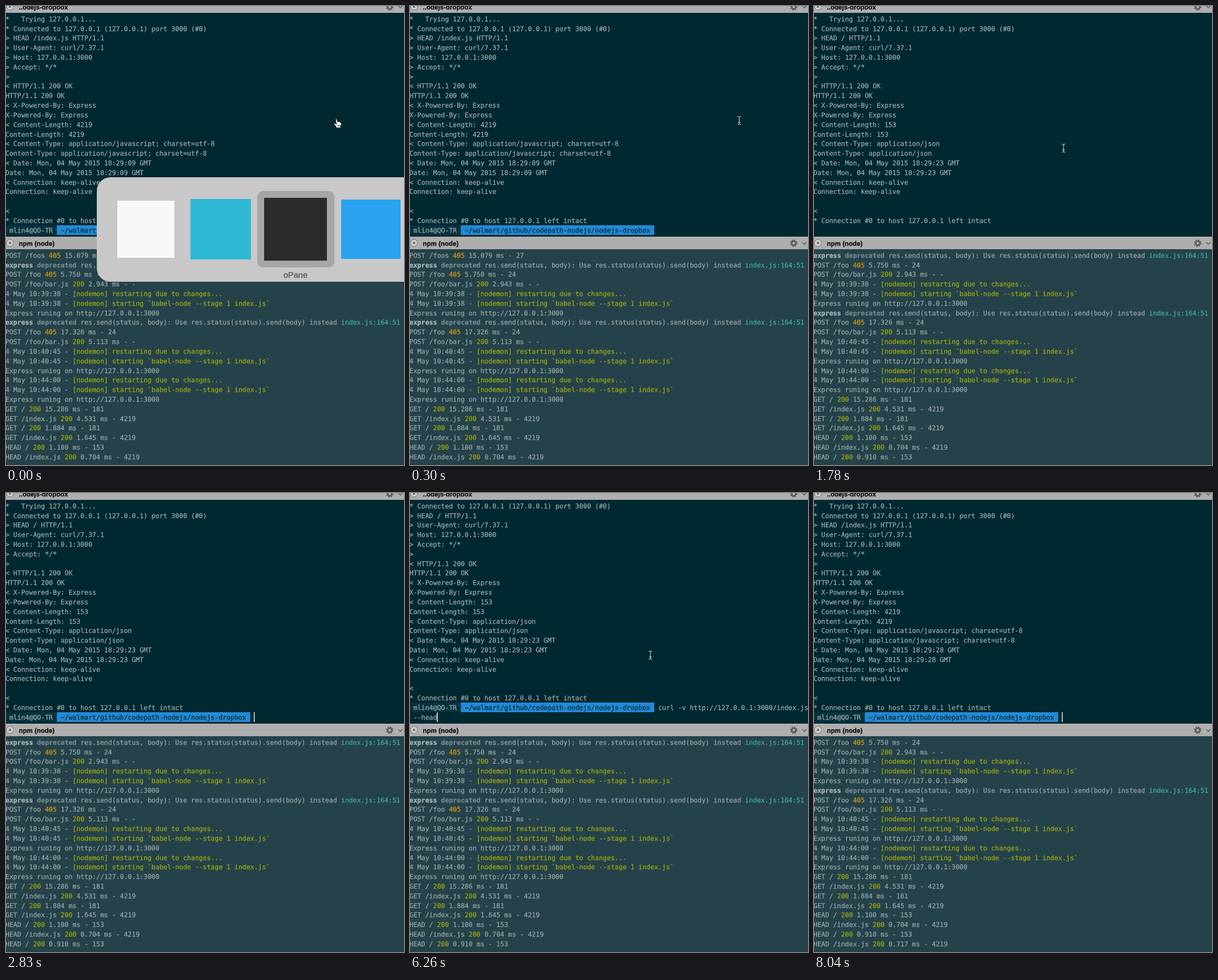
Recreate the animation shown at these times as an HTML page with a canvas. Size 697 px wide and 804 px high, loop 8.73 s.

```html
<!DOCTYPE html>
<html lang="en">
<head>
<meta charset="utf-8">
<title>Terminal session</title>
<style>
html, body { margin: 0; width: 100%; height: 100%; overflow: hidden; background: #002831; }
canvas { display: block; }
</style>
</head>
<body>
<canvas id="stage" width="697" height="804"></canvas>
<script>
const ctx = document.getElementById('stage').getContext('2d');
const LOOP = 8730, LEFT = -1, CHAR = 6.915, ROW = 16.82;
const TOP_BASE = 26.7, LOG_BASE = 440.7;
const MONO = '11.49px "DejaVu Sans Mono", monospace';
const SANS = '"Liberation Sans", Arial, sans-serif';
const TEXT = '#95a4a4';
const USER = ' mlin4@QO-TR ';
const PATH = ' ~/walmart/github/codepath-nodejs/nodejs-dropbox ';
const PROMPT = USER.length + PATH.length + 1;
const CURL = 'curl -v http://127.0.0.1:3000';

function response(path, length, type, time) {
  const headers = ['HTTP/1.1 200 OK', 'X-Powered-By: Express', 'Content-Length: ' + length,
    'Content-Type: application/' + type, `Date: Mon, 04 May 2015 ${time} GMT`, 'Connection: keep-alive'];
  return ['*   Trying 127.0.0.1...', '* Connected to 127.0.0.1 (127.0.0.1) port 3000 (#0)',
    `> HEAD ${path} HTTP/1.1`, '> User-Agent: curl/7.37.1', '> Host: 127.0.0.1:3000', '> Accept: */*', '>',
    ...headers.flatMap(h => ['< ' + h, h]),
    '', '<', '* Connection #0 to host 127.0.0.1 left intact'];
}
const script = 'javascript; charset=utf-8';
const first = response('/index.js', 4219, script, '18:29:09');
const second = response('/', 153, 'json', '18:29:23');
const third = response('/index.js', 4219, script, '18:29:28');

const restart = time => [
  `4 May ${time} - [nodemon] restarting due to changes...`,
  `4 May ${time} - [nodemon] starting \`babel-node --stage 1 index.js\``,
  'Express runing on http://127.0.0.1:3000'];
const deprecated = 'express deprecated res.send(status, body): Use res.status(status).send(body) instead index.js:164:51';
const log = [
  'POST /foos 405 15.079 ms - 27', deprecated,
  'POST /foo 405 5.750 ms - 24', 'POST /foo/bar.js 200 2.943 ms - -',
  ...restart('10:39:38'), deprecated,
  'POST /foo 405 17.326 ms - 24', 'POST /foo/bar.js 200 5.113 ms - -',
  ...restart('10:40:45'), ...restart('10:44:00'),
  'GET / 200 15.286 ms - 181', 'GET /index.js 200 4.531 ms - 4219',
  'GET / 200 1.884 ms - 181', 'GET /index.js 200 1.645 ms - 4219',
  'HEAD / 200 1.100 ms - 153', 'HEAD /index.js 200 0.704 ms - 4219',
  'HEAD / 200 0.910 ms - 153', 'HEAD /index.js 200 0.717 ms - 4219'];

const logStyles = [
  [/^\[nodemon|^200$/, '#97a414'], [/^405$/, '#ca9519'], [/^express$/, '#a9b5b5', 'bold '],
  [/^deprecated$/, '#71878b', 'bold '], [/^index\.js:/, '#3da8a0'], [/^/, '#93a1a2']];

const colX = col => LEFT + col * CHAR;

function rect(x, y, w, h, color, radius = 0) {
  ctx.fillStyle = color;
  ctx.beginPath();
  ctx.roundRect(x, y, w, h, radius);
  ctx.fill();
}

// A hairline stroke gives the heavier look of smoothed screen type
function text(str, x, y, color, font = MONO) {
  ctx.font = font;
  ctx.fillStyle = ctx.strokeStyle = color;
  ctx.lineWidth = 0.3;
  ctx.fillText(str, x, y);
  ctx.strokeText(str, x, y);
}

function line(points, color, width, fill) {
  ctx.beginPath();
  points.forEach(([x, y]) => ctx.lineTo(x, y));
  if (fill) {
    ctx.closePath();
    ctx.fillStyle = fill;
    ctx.fill();
  }
  ctx.strokeStyle = color;
  ctx.lineWidth = width;
  ctx.stroke();
}

function ring(x, y, r, width, dash = []) {
  ctx.setLineDash(dash);
  ctx.strokeStyle = '#555';
  ctx.lineWidth = width;
  ctx.beginPath();
  ctx.arc(x, y, r, 0, Math.PI * 2);
  ctx.stroke();
  ctx.setLineDash([]);
}

function titleBar(y, title) {
  rect(0, y, 697, 22, '#aeaeae');
  rect(1, y + 5, 12, 12, '#d2d2d2', 6);
  ring(7, y + 11, 6, 0.7);
  line([[5, y + 9], [9, y + 13]], '#555', 1.2);
  line([[9, y + 9], [5, y + 13]], '#555', 1.2);
  text(title, 22.5, y + 15.7, '#111', 'bold 11.5px ' + SANS);
  ring(672, y + 11.5, 3.6, 2.4);
  ring(672, y + 11.5, 5.6, 1.8, [Math.PI * 0.7, Math.PI * 0.7]);
  line([[687, y + 10], [690.5, y + 13.5], [694, y + 10]], '#555', 1.3);
}

function logLine(str, y) {
  let col = 0;
  for (const part of str.split(/(\[nodemon\].*|\b200\b|\b405\b|^express|deprecated|index\.js:\S+)/)) {
    const [, color, weight = ''] = logStyles.find(([pattern]) => pattern.test(part));
    text(part, colX(col), y, color, weight + MONO);
    col += part.length;
  }
}

function prompt(row, command, caret) {
  const y = Math.round(384.3 + (row - 22) * ROW), base = TOP_BASE + row * ROW, split = colX(USER.length);
  rect(0, y, split, 17, '#07333e');
  rect(split, y, PATH.length * CHAR, 17, '#2389d5');
  text(USER, LEFT, base, TEXT);
  text(PATH, split, base, '#05303b');
  // The command wraps after 101 columns
  const room = 101 - PROMPT, lines = [command.slice(0, room), command.slice(room)];
  text(lines[0], colX(PROMPT), base, TEXT);
  text(lines[1], LEFT, base + ROW, TEXT);
  if (!caret) return;
  const wrapped = lines[1].length > 0;
  const x = wrapped ? colX(lines[1].length) : colX(PROMPT + command.length);
  rect(Math.floor(x), y + (wrapped ? 17 : 0), 1.4, 17, '#f4f8f8');
}

const cursors = {
  beam() {
    const shape = [[[-3, -7], [-1, -7], [0, -6], [0, 6], [-1, 7], [-3, 7]],
      [[3, -7], [1, -7], [0, -6]], [[3, 7], [1, 7], [0, 6]], [[-2, 3], [2, 3]]];
    shape.forEach(points => line(points, '#dfe6e6', 1));
  },
  arrow() {
    line([[0, 0], [0, 13], [3, 10.2], [5.2, 15.4], [7.5, 14.4], [5.3, 9.4], [9.4, 9.4]], '#fff', 1.2, '#111');
  },
  hand() {
    line([[-3, -7], [-1, -7.5], [1, -2], [3, -2.8], [5, -1.5], [7, -0.5], [7.5, 3], [6, 6], [6, 8.5],
      [-1, 8.5], [-3, 5], [-6, 1.5], [-5, 0], [-1.5, 2]], '#111', 1, '#fff');
    [1, 3, 5].forEach(x => line([[x, 3], [x, 6.5]], '#111', 0.8));
  }
};

// Number of changes already made in a run of steps about 148 ms apart
const steps = (t, start) => Math.floor((t - start + 2) / 148) + 1;
const mix = (a, b, k) => a + (b - a) * k;

function pointer(t) {
  if (t < 300) return ['hand', 580, 205];
  if (t < 440) return ['beam', 576.5, 200.5];
  if (t < 1190) return ['beam', 437, 249];
  if (t < 1480) return ['arrow', 437, 245];
  if (t < 2830) return ['beam', 437, 249];
  if (t < 5080) return null;
  if (t < 5230) return ['arrow', 437, 281];
  if (t < 7300) {
    const k = Math.min(1, (steps(t, 5080) - 1) / 5);
    return ['beam', mix(437, 421, k), mix(289, 284, k)];
  }
  if (t >= 8040) return null;
  const k = Math.min(1, steps(t, 7300) / 5);
  return ['beam', mix(421, 682, k), mix(284, 798, k)];
}

function switcher() {
  rect(159, 300, 580, 183, '#c8c8c8', 24);
  rect(440, 324, 135, 134, '#a5a7a7', 10);
  rect(195, 341, 100, 100, '#f8f8f8');
  rect(323, 338, 106, 106, '#2fb9d5');
  rect(452, 336, 110, 110, '#2b2b2b');
  rect(587, 339, 104, 104, '#2aa2f0');
  ctx.textAlign = 'center';
  text('oPane', 507, 476, '#555', '14.5px ' + SANS);
  ctx.textAlign = 'left';
}

function draw(t) {
  rect(0, 0, 697, 404, '#002831');
  rect(0, 404, 697, 400, '#25424a');

  const wrapped = t >= 6260 && t < 6560;
  const output = t < 1780 ? first : t < 6560 ? second : third;
  output.slice(wrapped ? 1 : 0).forEach((str, i) => text(str, LEFT, TOP_BASE + i * ROW, TEXT));

  let command = '';
  if ((t >= 1480 && t < 1780) || (t >= 6110 && t < 6260)) command = CURL + ' --head';
  if (wrapped) command = CURL + '/index.js --head';
  if (t < 1780 || t >= 1930) prompt(wrapped ? 21 : 22, command, t >= 740);

  const scroll = t < 1780 ? 0 : t < 6560 ? 1 : 2;
  log.slice(scroll, scroll + 22).forEach((str, i) => logLine(str, LOG_BASE + i * ROW));

  titleBar(-10, '..odejs-dropbox');
  titleBar(404, 'npm (node)');
  if (t < 150) switcher();

  const mouse = pointer(t);
  if (mouse) {
    ctx.save();
    ctx.translate(mouse[1], mouse[2]);
    cursors[mouse[0]]();
    ctx.restore();
  }
}

ctx.textRendering = 'geometricPrecision';
const start = performance.now();
function tick() {
  draw((performance.now() - start) % LOOP);
  requestAnimationFrame(tick);
}
tick();
</script>
</body>
</html>
```
